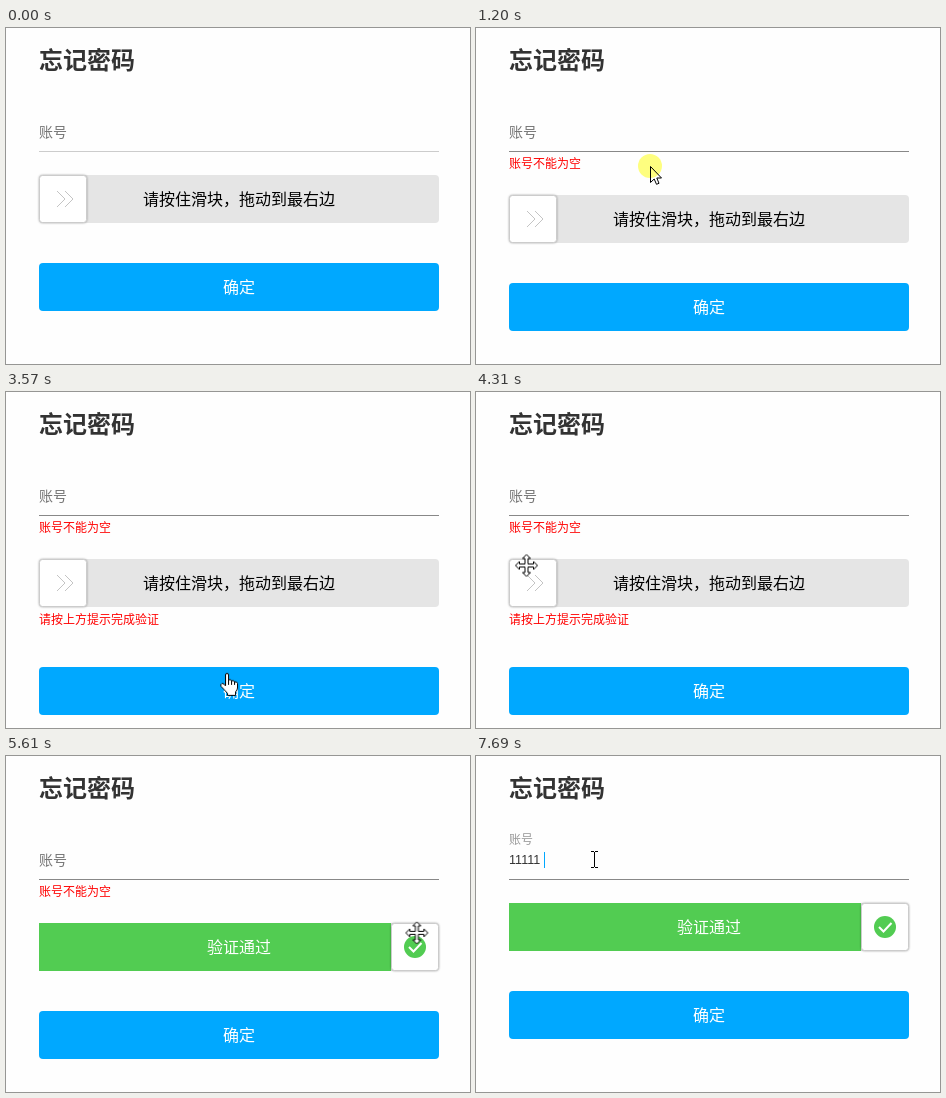
An HTML page that plays this animation: 464x336 px, repeating every 8000 ms.

```html
<!DOCTYPE html>
<html lang="zh-CN">
<head>
<meta charset="utf-8">
<title>忘记密码</title>
<style>
  html, body { margin: 0; width: 100%; height: 100%; overflow: hidden; background: #fefefe; }
  svg { position: absolute; left: 0; top: 0; display: block; }
  text { font: 16px "Noto Sans CJK SC", "Noto Sans CJK", "Noto Sans", sans-serif; }
  .title { font-size: 24px; font-weight: bold; fill: #333; }
  .error { font-size: 12px; fill: #f00; }
  .mid { text-anchor: middle; }
  .light { fill: #fff; }

  /* 1% of the loop is 80 ms */
  .flip { animation: 8s step-end infinite; }
  .move { animation: 8s linear infinite; }

  #label { font-size: 14px; animation-name: label; }
  #line { animation-name: line; }
  #slider { animation-name: slider; }
  #button { animation-name: button; }
  #noName { animation-name: noName; }
  #noCheck { animation-name: noCheck; }
  #bar { animation-name: bar; }
  #knob { animation-name: knob; }
  #knob rect { filter: drop-shadow(0 0 1px rgba(0, 0, 0, .35)); }
  .todo { animation-name: todo; }
  .done { animation-name: done; }
  .cursor { animation-name: path; }
  .cursor path { fill: #fff; stroke: #000; }
  #glow { mix-blend-mode: multiply; }
  #glow circle { fill: #ffff80; animation-name: press; }
  #arrow { animation-name: arrow; }
  #beam { animation-name: beam; }
  #hand { animation-name: hand; }
  #cross { animation-name: cross; }

  #typed {
    position: absolute; left: 33px; top: 96px; height: 16px; overflow: hidden;
    font: 12.6px/17px "Liberation Sans", Arial, sans-serif; color: #333;
    border-right: 1px solid #00a8ff; animation-name: typed, caret;
  }

  @keyframes label {
    0%, 7%, 15%, 75% { transform: translate(33px, 109px); fill: #757575; }
    9.5%, 12.75%, 77.25%, 100% { transform: translate(33px, 87.6px) scale(.857); fill: #999; }
  }
  @keyframes line {
    0%, 7% { fill: #ccc; }
    9.5%, 100% { fill: #888; }
  }
  @keyframes slider {
    0%, 75%, 100% { transform: none; }
    12.75% { transform: translateY(20px); }
  }
  @keyframes button {
    0%, 75%, 100% { transform: none; }
    12.75%, 62.6% { transform: translateY(20px); }
    34.75% { transform: translateY(40px); }
  }
  @keyframes noName {
    0%, 75%, 100% { visibility: hidden; }
    12.75% { visibility: visible; }
  }
  @keyframes noCheck {
    0%, 62.6%, 100% { visibility: hidden; }
    34.75% { visibility: visible; }
  }
  @keyframes todo {
    0% { visibility: visible; }
    62.6%, 100% { visibility: hidden; }
  }
  @keyframes done {
    0% { visibility: hidden; }
    62.6%, 100% { visibility: visible; }
  }
  @keyframes bar {
    0%, 59.8% { width: 0; }
    60.875% { width: 72px; }
    61.875% { width: 220px; }
    62.6%, 100% { width: 352px; }
  }
  @keyframes knob {
    0%, 59.8% { transform: none; }
    60.875% { transform: translateX(72px); }
    61.875% { transform: translateX(220px); }
    62.6%, 100% { transform: translateX(352px); }
  }
  @keyframes path {
    0%, 1.74% { transform: translate(500px, 128px); }
    1.75% { transform: translate(441px, 128px); }
    3.75% { transform: translate(330px, 112px); }
    5.75% { transform: translate(215px, 101px); }
    6.5%, 10% { transform: translate(193px, 102px); }
    11.6%, 25.12% { transform: translate(174px, 138px); }
    25.125%, 27.75% { transform: translate(173px, 138px); }
    28.75% { transform: translate(163px, 190px); }
    29.75% { transform: translate(166px, 262px); }
    30.25% { transform: translate(181px, 288px); }
    31.25%, 44.625% { transform: translate(220px, 281px); }
    45.5% { transform: translate(222px, 272px); }
    47.5% { transform: translate(190px, 215px); }
    50% { transform: translate(120px, 160px); }
    51.875% { transform: translate(80px, 146px); }
    53.125% { transform: translate(55px, 160px); }
    53.75% { transform: translate(50px, 172px); }
    54.5%, 55.125% { transform: translate(50px, 180px); }
    56.25%, 59.625% { transform: translate(52px, 191px); }
    60.875% { transform: translate(146px, 194px); }
    61.875% { transform: translate(290px, 195px); }
    63.125%, 70.12% { transform: translate(490px, 195px); }
    70.125% { transform: translate(411px, 177px); }
    71.25% { transform: translate(350px, 165px); }
    72.5% { transform: translate(240px, 135px); }
    73.75% { transform: translate(150px, 108px); }
    74.375%, 79.74% { transform: translate(116px, 104px); }
    79.75%, 83.24% { transform: translate(115px, 104px); }
    83.25%, 100% { transform: translate(118px, 103px); }
  }
  @keyframes press {
    0%, 8.75%, 16.875%, 34.75%, 63.2%, 76.5%, 100% { visibility: hidden; }
    7%, 12.75%, 33.125%, 57.375%, 75% { visibility: visible; }
  }
  @keyframes arrow {
    0%, 10.95%, 45.4%, 70.7% { visibility: visible; }
    2.4%, 29.6%, 53.5%, 73.06%, 100% { visibility: hidden; }
  }
  @keyframes beam {
    0%, 10.95% { visibility: hidden; }
    2.4%, 73.06%, 100% { visibility: visible; }
  }
  @keyframes hand {
    0%, 45.4%, 100% { visibility: hidden; }
    29.6% { visibility: visible; }
  }
  @keyframes cross {
    0%, 70.7%, 100% { visibility: hidden; }
    53.5% { visibility: visible; }
  }
  @keyframes typed {
    0% { width: 0; }
    85.6% { width: 7px; }
    88% { width: 14px; }
    90.5% { width: 21px; }
    92.625% { width: 28px; }
    96.125%, 100% { width: 35px; }
  }
  @keyframes caret {
    0%, 12.75%, 83.25% { visibility: hidden; }
    7%, 75%, 85.6%, 100% { visibility: visible; }
  }
</style>
</head>
<body>
<svg width="464" height="336" viewBox="0 0 464 336">
  <rect width="464" height="336" fill="#fefefe"/>
  <text class="title" x="33" y="41">忘记密码</text>
  <text id="label" class="move">账号</text>
  <rect id="line" class="move" x="33" y="123" width="400" height="1"/>
  <text id="noName" class="error flip" x="33" y="140">账号不能为空</text>
  <text id="noCheck" class="error flip" x="33" y="232">请按上方提示完成验证</text>

  <g id="slider" class="flip">
    <rect x="33" y="147" width="400" height="48" rx="4" fill="#e5e5e5"/>
    <text class="mid todo flip" x="233" y="177">请按住滑块，拖动到最右边</text>
    <rect id="bar" class="move" x="33" y="147" height="48" fill="#52cc52"/>
    <text class="mid light done flip" x="233" y="177">验证通过</text>
    <g id="knob" class="move" fill="none">
      <rect x="33.5" y="147.5" width="47" height="47" rx="3" fill="#fff" stroke="#ccc"/>
      <path class="todo flip" d="M51 163l8 8-8 8M59 163l8 8-8 8" stroke="#c4c4c4"/>
      <g class="done flip">
        <circle cx="57" cy="171" r="11" fill="#52cc52"/>
        <path d="M51 171l4.500 4.500 8-8.500" stroke="#fff" stroke-width="2"/>
      </g>
    </g>
  </g>

  <g id="button" class="flip">
    <rect x="33" y="235" width="400" height="48" rx="4" fill="#00a8ff"/>
    <text class="mid light" x="233" y="265">确定</text>
  </g>

  <g class="cursor move">
    <path id="arrow" class="flip" d="M.5.5V16.500L4.200 13 6.500 18.300 9 17.300 6.800 12H11.500Z"/>
    <path id="beam" class="flip" d="M-3-7.500H0M1-7.500H4M.5-7V8M-3 8.500H0M1 8.500H4"/>
    <path id="hand" class="flip" transform="translate(-6 0)" d="M5.500 2Q5.500.5 7 .5T8.500 2V7Q11 6 11.500 8 14 7 14.500 9 17 8.500 17.500 10.500V15Q17.500 17 15.500 19V22.500H7.500V20.500Q4 16.500 1 13.500 0 11.500 2 10.500 4 10.500 5.500 13ZM8.500 7V12M11.500 8V12M14.500 9V12"/>
    <path id="cross" class="flip" d="M.5-11L4.500-7H2V-1.500H7.500V-4L11.500 0 7.500 4V1.500H2V7H4.500L.5 11-3.500 7H-1V1.500H-6.500V4L-10.500 0-6.500-4V-1.500H-1V-7H-3.500Z"/>
  </g>
  <g id="glow" class="cursor move"><circle class="flip" r="12"/></g>
</svg>
<div id="typed" class="flip">11111</div>
</body>
</html>
```
